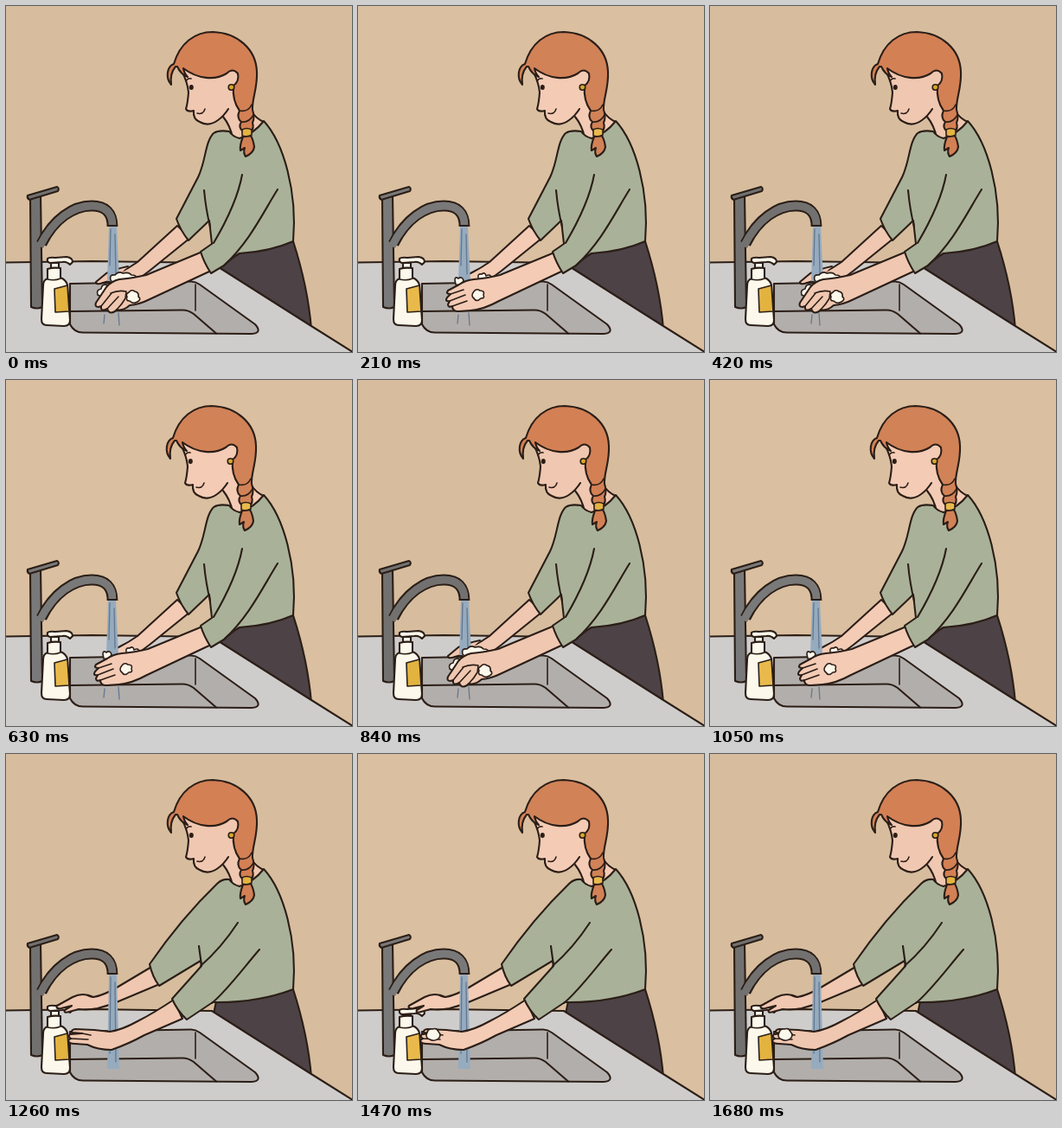
Write an HTML page that moves like this. It is 400 by 400 pixels and loops after 1890 ms.

```html
<!DOCTYPE html>
<html lang="en">
<head>
<meta charset="utf-8">
<title>Washing hands</title>
<style>
html, body { margin: 0; width: 100%; height: 100%; overflow: hidden; background: #d7bd9d; }
svg {
  display: block; width: 100vw; height: 100vh;
  --wall: #d7bd9e; --skin: #f0c7b0; --hair: #d38055; --metal: #727170; --gold: #e3b340;
}
svg.lit { --wall: #dabfa0; --skin: #f4cbb5; --hair: #d18257; --metal: #7a7979; --gold: #e9ba4b; }
path, circle, ellipse { stroke-linecap: round; stroke-linejoin: round; }
.o { stroke: #2b1e17; stroke-width: 2.1; }
.n { fill: none; }
.thin { stroke-width: 1.6; }
.skin { fill: var(--skin); }
.hair { fill: var(--hair); }
.shirt { fill: #a9b299; }
.skirt { fill: #4d4245; }
.metal { fill: var(--metal); }
.white { fill: #fcf8eb; }
.gold { fill: var(--gold); }
.water { fill: #97abbe; }
.streak { fill: none; stroke: #63788f; stroke-width: 1.3; }
.tube { fill: none; stroke: #2b1e17; stroke-width: 12.8; }
.tube.in { stroke: var(--metal); stroke-width: 8.8; }
.tube, .tube.in { stroke-linecap: butt; }
</style>
</head>
<body>
<svg id="stage" viewBox="0 0 400 400">
  <rect width="400" height="400" style="fill:var(--wall)"/>

  <path class="o skirt" d="M243 286L332 272C341 300 350 335 353 374L320 372L238 310Z"/>

  <path fill="#cfcdcc" d="M0 296L237 297L400 399V400H0Z"/>
  <path class="o n" d="M0 296.5L100 295L238 297L353 370L400 399.5"/>

  <path class="o" fill="#b2aeab" d="M74 321L214 318.5Q219 318.5 224 322L288 368Q297 378 284 379L90 377.5Q79 378 74 368Z"/>
  <path class="o n" d="M74 353L204 351.5Q211 351.5 217 356L243 378.5"/>
  <path class="o n thin" d="M219 322V352"/>

  <path class="o metal" d="M28 221L40 218L42 348Q36 351 29 348Z"/>
  <path class="tube" d="M41 275C55 246 78 231 99 231C115 231 123 239 123 255"/>
  <path class="tube in" d="M39 278C55 246 78 231 99 231C115 231 123 239 123 253"/>
  <path class="o metal" d="M25 219L59 209Q62 211 60 214L27 224Q24 222 25 219Z"/>

  <g id="pump">
    <path class="o white" d="M52 297H61V306H52Z"/>
    <path class="o white" d="M48 292Q50 290 57 291L70 290Q77 291 77 296L74 299Q70 295 65 296L51 297Q47 296 48 292Z"/>
  </g>
  <path class="o white" d="M48 304Q55 302 63 303V314Q70 317 71 323L74 363Q74 370 67 370L47 369Q41 369 41 362L43 323Q43 317 48 315Z"/>
  <path class="o n thin" d="M48 316Q56 318 63 315"/>
  <path class="o gold thin" d="M56 327L71 323L73 353L57 354Z"/>

  <g data-pose="A B">
    <path class="o skin" d="M198 254L152 296Q142 303 132 308L120 314Q115 319 126 322L150 318L166 306L213 268Z"/>
  </g>
  <g data-pose="A">
    <path class="o skin" d="M141 301Q126 304 116 309L104 319Q104 323 112 320L126 316"/>
  </g>
  <g data-pose="C">
    <path class="o skin" d="M170 245L128 270Q113 279 101 281Q89 275 77 281L59 291Q57 295 64 294L76 291L68 296Q66 300 73 298L84 295Q96 296 106 294Q118 291 130 286L180 265Z"/>
    <path class="o n thin" d="M101 281Q97 281 94 279"/>
  </g>

  <path id="stream" class="water"/>
  <path id="lines" class="streak"/>

  <g data-pose="A">
    <path class="o white thin" d="M121 317Q119 310 126 311Q130 306 135 309Q142 307 145 311Q152 311 151 316Q147 321 140 318L126 322Z"/>
    <path class="o white thin" d="M118 323Q111 320 110 327Q104 328 106 334Q112 338 118 332Z"/>
    <path class="o skin" d="M227 284L162 311Q145 315 131 316Q122 318 116 325L104 343Q102 348 107 348L110 347Q109 353 115 351L117 350Q119 357 126 353L128 351Q135 353 143 346Q154 345 164 340L237 306Z"/>
    <path class="o n thin" d="M110 347L122 332M117 350L130 336M128 351Q134 345 138 338L139 330Q130 328 121 332"/>
    <path class="o white thin" d="M142 331Q145 327 149 330Q154 331 153 336Q157 339 152 342Q147 345 143 341Q138 341 140 336Q138 333 142 331Z"/>
  </g>
  <g data-pose="B">
    <path class="o white thin" d="M112 317Q112 312 116 315Q120 312 122 317L120 323L113 322Z"/>
    <path class="o white thin" d="M139 314Q138 309 143 310Q147 307 148 312Q154 309 154 315L152 319L141 318Z"/>
    <path class="o skin" d="M227 285L164 311Q148 315 134 316Q124 317 117 322L104 329Q101 333 107 333L103 337Q100 342 106 341L104 345Q104 349 109 347Q109 353 116 353L130 352Q145 351 163 341L237 306Z"/>
    <path class="o n thin" d="M107 333L122 328M106 341L124 334M109 347L126 341"/>
    <path class="o white thin" d="M134 330Q137 326 141 329Q147 329 145 334Q147 338 142 338Q137 343 134 338Q130 335 134 330Z"/>
  </g>
  <g data-pose="C">
    <path class="o skin" d="M194 284Q170 300 152 309Q134 319 120 321L102 319L80 318Q75 319 76 322L88 323L74 324Q71 327 75 329L72 331Q72 335 80 335L94 336Q106 342 122 342Q142 335 160 325L204 306Z"/>
    <path class="o n thin" d="M88 323L98 325M75 329L95 330"/>
    <path id="soap" class="o white thin" d="M80 322Q81 317 86 318Q91 316 93 321Q97 325 93 329Q88 333 83 330Q77 328 80 322Z"/>
  </g>

  <path class="skin" d="M249 125Q258 138 261 155L275 160L299 135L284 120L262 98Z"/>
  <path class="o n" d="M251 128Q259 138 262 152M284 122Q289 130 298 134"/>
  <g data-pose="A B">
    <path class="o shirt" d="M258 145Q246 143 240 147C230 157 231 180 222 198L197 246Q202 260 211 271L235 248L238 275L225 284Q229 297 237 309L252 300Q261 291 270 286Q305 284 332 272C337 215 321 158 298 133Q286 148 270 153Q262 151 258 145Z"/>
    <path class="o n" d="M229 213Q231 235 236 255M273 195C268 222 253 252 240 274M314 212C297 239 282 272 252 300"/>
  </g>
  <g data-pose="C">
    <path class="o shirt" d="M258 145Q250 144 244 150C215 178 186 214 166 243Q169 257 177 268L225 239L226 245L192 283Q198 297 209 307L239 287Q290 288 332 272C337 215 321 158 298 133Q286 148 270 153Q262 151 258 145Z"/>
    <path class="o n" d="M223 222L226 244M268 195Q249 224 225 245M293 226C274 248 255 274 238 288"/>
  </g>

  <g id="head">
    <path class="skin" d="M196 68Q208 82 211 100Q210 113 208 119Q210 123 217 121Q216 131 224 134Q234 140 245 132L258 119L272 100L274 74L215 55Z"/>
    <path class="o n" d="M203 75Q210 88 211 100Q210 113 208 119Q210 123 217 121Q216 131 224 134Q234 140 245 132Q252 127 257 119"/>
    <path class="o hair" d="M274 151Q270 161 271 167L276 164Q274 170 277 174Q286 170 287 163Q286 155 283 150Z"/>
    <path class="o hair" d="M191 91C184 83 186 70 194 67C201 43 218 30 239 30C268 31 289 50 290 76C291 95 284 108 285 120Q288 129 285 135Q287 141 283 146L274 145Q268 140 272 134Q266 129 270 121C264 113 262 103 263 92Q270 87 268 78Q262 71 255 78C242 86 222 85 205 72Q206 78 210 82Q202 79 198 70L196 70C191 76 190 84 191 91Z"/>
    <path class="o n thin" d="M270 121Q280 123 284 114M272 134Q281 135 286 126"/>
    <path class="o gold thin" d="M273 143Q278 140 284 143V149Q279 152 273 150Z"/>
    <circle class="o thin" cx="260.5" cy="94" r="3.3" fill="#d5a826"/>
    <ellipse cx="214.3" cy="94" rx="2.5" ry="3" fill="#2b1e17"/>
    <path class="o n thin" d="M208 87Q210 83 214 84M221 124Q228 126 230 119"/>
  </g>
</svg>

<script>
const STEP = 210;
const steps = ["A", "B", "A", "B", "A", "B", "C", "C", "C"];
const el = id => document.getElementById(id);
const poses = [...document.querySelectorAll("[data-pose]")];
let last = -1;

function show(i) {
  const pose = steps[i], odd = i % 2 === 1, rinsing = pose !== "C";
  for (const g of poses) {
    g.style.display = g.dataset.pose.includes(pose) ? "" : "none";
  }
  // The line art alternates between two slightly different drawings.
  el("stage").classList.toggle("lit", odd);
  el("head").setAttribute("transform", odd ? "translate(-1 0)" : "");
  el("pump").setAttribute("transform", i === 7 ? "translate(0 4)" : "");
  el("soap").style.display = i > 6 ? "" : "none";

  const end = rinsing ? 318 : 364, s = odd ? -1 : 0;
  el("stream").setAttribute("d", `M${119 + s} 255H${128 + s}L${131 + s} ${end}H${117 + s}Z`);
  const drip = (i % 3) * 2;
  el("lines").setAttribute("d",
    `M${121 + s} 258L${120 + s} ${end - 18}M${126 + s} 264L${127 + s} ${end - 8}` +
    (rinsing ? `M${114 + drip} 357l-1 10M${130 - drip} 355l1 14` : ""));
}

function tick() {
  const i = Math.floor(performance.now() / STEP) % steps.length;
  if (i !== last) show(last = i);
  requestAnimationFrame(tick);
}
tick();
</script>
</body>
</html>
```
